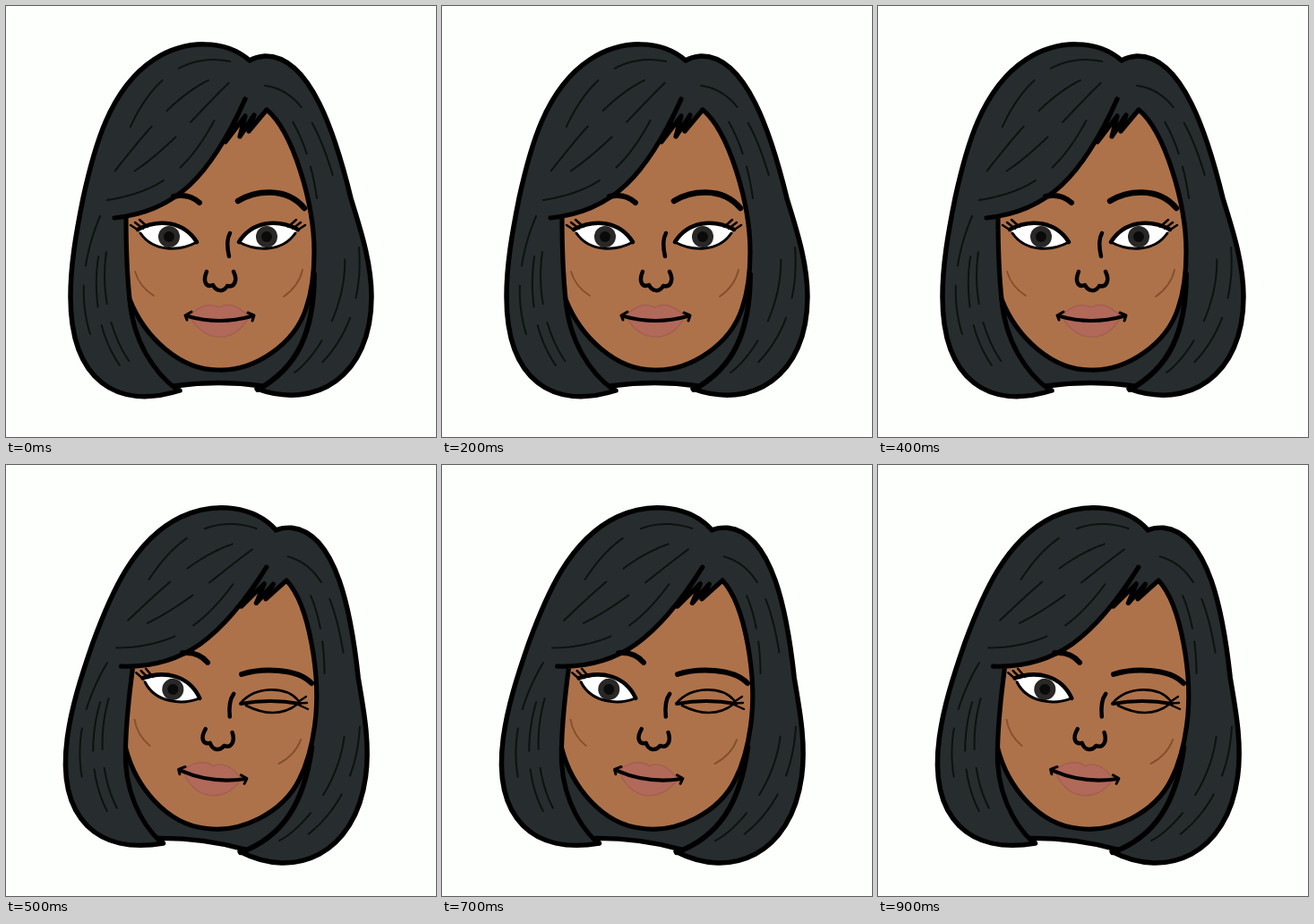
An HTML page with a canvas for the animation above (1 s loop, 480 by 482 pixels).

```html
<!DOCTYPE html>
<html lang="en">
<head>
<meta charset="utf-8">
<title>Wink</title>
<style>
html, body { margin: 0; width: 100%; height: 100%; overflow: hidden; background: #fdfffc; }
canvas { display: block; }
</style>
</head>
<body>
<canvas id="stage" width="480" height="482"></canvas>
<script>
const ctx = document.getElementById('stage').getContext('2d');
const PAPER = '#fdfffc', HAIR = '#272c2e', SKIN = '#ae724a', STRAND = '#0c120d', CHEEK = '#80502c';
const LOOP = 1000, WINK_AT = 500;
const TILT = 0.132, PIVOT = [238, 287];
const HAIR_SQUASH = 0.985, HAIR_BASE = 430;

function line(path, width, color = '#000') {
  ctx.lineWidth = width;
  ctx.strokeStyle = color;
  ctx.stroke(new Path2D(path));
}

function fill(path, color) {
  ctx.fillStyle = color;
  ctx.fill(new Path2D(path));
}

function disc(x, y, r, color) {
  ctx.fillStyle = color;
  ctx.beginPath();
  ctx.arc(x, y, r, 0, 2 * Math.PI);
  ctx.fill();
}

function scoped(draw) {
  ctx.save();
  draw();
  ctx.restore();
}

function tilt() {
  ctx.translate(...PIVOT);
  ctx.rotate(TILT);
  ctx.translate(-PIVOT[0], -PIVOT[1]);
}

function squash() {
  ctx.translate(0, HAIR_BASE * (1 - HAIR_SQUASH));
  ctx.scale(1, HAIR_SQUASH);
}

const mix = (a, b, t) => a + (b - a) * t;

// Part of a cubic with points [x, y, x, y, ...], from t0 to t1
function strand(p, t0, t1) {
  const at = (t, k) => {
    const s = 1 - t;
    return s ** 3 * p[k] + 3 * s * s * t * p[k + 2] + 3 * s * t * t * p[k + 4] + t ** 3 * p[k + 6];
  };
  let path = '';
  for (let i = 0; i <= 12; i++) {
    const t = mix(t0, t1, i / 12);
    path += `${i ? 'L' : 'M'}${at(t, 0)} ${at(t, 1)}`;
  }
  line(path, 2, STRAND);
}

// Rows blended between two guide curves, each broken by a staggered gap
function lock(a, b, rows) {
  for (let i = 0; i < rows; i++) {
    const row = a.map((v, k) => mix(v, b[k], i / (rows - 1)));
    const start = i % 2 * 0.16;
    strand(row, start, start + 0.36);
    strand(row, start + 0.5, start + 0.84);
  }
}

function hair() {
  const outer = `M272 61 C245 37 200 37 165 60 C115 93 98 160 86 215 C78 255 72 290 72 325
    C72 420 125 452 194 430 L188 425 Q238 418 286 425 L280 428 C345 452 408 415 408 325
    C408 285 394 245 385 215 C368 145 340 55 289 56 Q278 57 272 61Z`;
  fill(outer, HAIR);
  line(outer, 5.5);
  lock([250, 62, 190, 50, 150, 95, 126, 168], [248, 98, 215, 165, 190, 205, 113, 217], 4);
  lock([105, 235, 84, 285, 78, 340, 104, 392], [112, 275, 104, 330, 122, 385, 150, 412], 3);
  lock([289, 89, 335, 95, 355, 150, 374, 222], [311, 115, 332, 145, 342, 180, 347, 215], 2);
  lock([394, 270, 398, 320, 385, 380, 330, 418], [374, 250, 392, 320, 350, 390, 322, 410], 2);
}

function face() {
  const edge = `M121 237 C190 230 228 190 267 104 L245 152 L267 123 L261 146 L277 122 L271 140 L291 116
    C320 140 344 220 344 275 Q344 312 335 338 C322 378 278 408 238 407
    C195 408 155 371 138 328 Q134 290 134 236`;
  fill(edge, SKIN);
  line(edge, 5.2);
  line('M138 328 C142 375 165 410 191 429', 5.2);
  line('M344 300 C344 365 325 405 281 429', 5.8);
}

function openEye() {
  const upper = 'M147 250 C170 238 198 240 213 264';
  const lower = 'C195 274 165 276 150 254';
  fill(upper + lower, '#fff');
  disc(182, 258, 12, '#292827');
  disc(182, 258, 6, '#0b0a0a');
  line(upper + lower, 3);
  line(upper, 4.6);
  for (let i = 0; i < 3; i++) line(`M${139 + 5 * i} ${245 - 3 * i} l9 ${6 + i}`, 2.5);
}

function mirror() {
  ctx.translate(473, 0);
  ctx.scale(-1, 1);
}

function features() {
  line('M144 297 Q149 314 165 324', 1.8, CHEEK);
  line('M331 295 Q327 313 310 325', 1.8, CHEEK);
  line('M250 254 Q245 263 249 280', 4.5);
  line('M224 297 C219 309 224 315 231 312 C235 320 243 320 247 313 C255 315 259 307 254 297', 4.5);
  const lips = 'M205 346 C220 332 230 333 238 337 C246 332 257 333 271 347 C257 378 220 378 205 346Z';
  fill(lips, '#b1695a');
  line(lips, 1.4, '#a45e50');
  line('M203 347 Q238 357 274 347', 4.2);
  line('M207 342 L200 346 L202 351 M270 343 L277 346 L275 352', 3);
  openEye();
}

function closedEye() {
  line('M263 234 C285 227 325 227 341 244', 6);
  line('M262 266 C279 247 312 247 326 263 M268 269 Q302 286 326 267', 2.6);
  line('M262 267 Q295 261 328 267', 4);
  for (let i = 0; i < 3; i++) line(`M326 ${265 + 1.5 * i} L${335 + i} ${259 + 7 * i}`, 2.3);
}

function head(winking) {
  ctx.fillStyle = PAPER;
  ctx.fillRect(0, 0, 480, 482);
  scoped(() => {
    if (winking) { squash(); tilt(); }
    hair();
    face();
    line('M187 213 Q204 209 216 220', 6);
    if (!winking) line('M259 218 C277 207 312 201 333 226', 6.5);
  });
  scoped(() => {
    if (winking) tilt();
    features();
  });
  if (winking) closedEye();
  else scoped(() => { mirror(); openEye(); });
}

ctx.lineCap = ctx.lineJoin = 'round';

function tick() {
  head(performance.now() % LOOP >= WINK_AT);
  requestAnimationFrame(tick);
}
tick();
</script>
</body>
</html>
```
